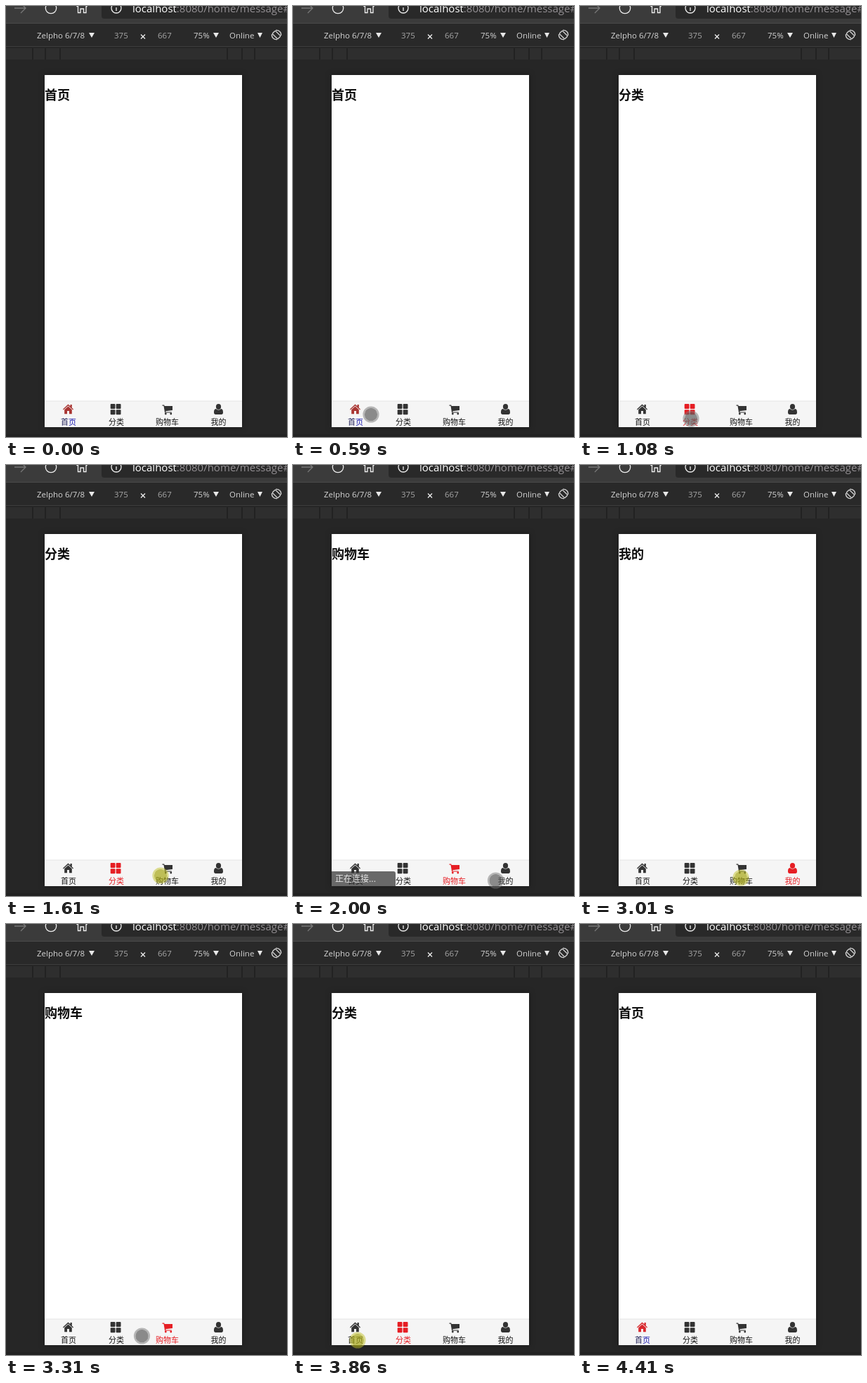
Recreate the animation shown at these times as an HTML page. Size 400 px wide and 612 px high, loop 4.72 s.

```html
<!DOCTYPE html>
<html lang="zh-CN">
<head>
<meta charset="utf-8">
<title>Tab bar</title>
<style>
  html, body { margin: 0; width: 100%; height: 100%; overflow: hidden; background: #262626; }
  svg { display: block; }
  text { font-family: "Open Sans", "Noto Sans", sans-serif; }
  .cjk text { font-family: "Noto Sans CJK SC", "Noto Sans CJK", sans-serif; }
  .tool { font-size: 11.5px; fill: #d4d4d4; }
  .dim { fill: #a6a6a6; }
  .line { fill: none; stroke: #eee; stroke-width: 1.3; }
  .page { fill: #fff; filter: drop-shadow(0 0 5px rgba(0, 0, 0, .3)); }
  .tab { fill: #333; }
  .tab text { font-size: 11px; text-anchor: middle; fill: #151515; }
  .tab.on, .tab.on text { fill: #e61e24; }
  #home.on { fill: #d9292e; }
  #home.on.old { fill: #a93532; }
  #home.on text { fill: #26265c; }
  #home.on tspan { fill: #1c1cb0; }
  #dot { fill: #5c5c5c; stroke: #777; }
  #dot.press { fill: #a6a614; stroke: #c4c42c; }
</style>
</head>
<body>
<svg width="400" height="612" viewBox="0 0 400 612">
  <rect width="400" height="24" fill="#3b3b3b"/>
  <rect x="136" y="-10" width="280" height="28" rx="4" fill="#292929"/>
  <path class="line" style="stroke:#777" d="M12 3H28M21 -4L28 3L21 10"/>
  <g class="line">
    <circle cx="64" cy="3" r="7.7"/>
    <path d="M102.5 -1V9.5H106V4H110.5V9.5H114V-1M100.5 1L108 -5L115.5 1"/>
    <circle cx="157" cy="3" r="7"/>
    <path d="M157 2V7"/>
  </g>
  <text x="180" y="9" font-size="15" fill="#fff">localhost<tspan fill="#949094">:8080/home/message#</tspan></text>

  <rect y="24" width="400" height="1" fill="#4a4a4a"/>
  <rect y="25" width="400" height="32" fill="#292929"/>
  <rect y="57" width="400" height="1" fill="#3d3d3d"/>
  <g class="tool">
    <text x="44" y="46">Zelpho 6/7/8</text>
    <text x="154" y="46" class="dim">375</text>
    <text x="216" y="46" class="dim">667</text>
    <text x="267" y="46">75%</text>
    <text x="318" y="46">Online</text>
  </g>
  <path fill="#e8e8e8" d="M118 38h8l-4 7zM295 38h8l-4 7zM358 38h7l-3.5 7z"/>
  <path class="line" d="M192 40.5l6 6m0 -6l-6 6"/>
  <g class="line" style="stroke:#d0d0d0" transform="translate(385 41)">
    <rect x="-3" y="-5.5" width="6" height="11" rx="1" transform="rotate(-45)"/>
    <path d="M-1 -6.5A6.5 6.5 0 0 1 6.5 1M1 6.5A6.5 6.5 0 0 1 -6.5 -1"/>
  </g>

  <rect y="60" width="400" height="16" fill="#2e2e2e"/>
  <path stroke="#222" stroke-width="2" d="M38 60v16M56 60v16M77 60v16M315 60v16M336 60v16M354 60v16"/>
  <rect y="608" width="400" height="4" fill="#222"/>

  <rect class="page" x="55" y="98" width="281" height="500"/>
  <rect x="55" y="561" width="281" height="37" fill="#f5f5f5"/>
  <rect x="55" y="560.5" width="281" height="1" fill="#e6e6e6"/>

  <g class="cjk">
    <text id="title" x="55" y="133" font-size="18" font-weight="700" fill="#0c0c0c"></text>
    <g class="tab" id="home">
      <path transform="translate(81 565)" d="M0 7.5L7.5 .5L10.5 3.3V1H12.8V5.5L15 7.5L14.2 8.5L7.5 2.6L.8 8.5ZM2.2 8.2L7.5 3.4L12.8 8.2V14.3H9V10H6V14.3H2.2Z"/>
      <text x="89" y="595">首<tspan>页</tspan></text>
    </g>
    <g class="tab">
      <g id="tiles" transform="translate(148.700 565)"></g>
      <text x="157" y="595">分类</text>
    </g>
    <g class="tab">
      <g transform="translate(222.500 566)">
        <path d="M0 .5H2.7L3.2 2H14.5V8L4.7 9.2L4.9 10.4H13.3V11.6H3.6L2 1.8H0Z"/>
        <circle cx="4.800" cy="13" r="1.400"/><circle cx="12.300" cy="13" r="1.400"/>
      </g>
      <text x="229.500" y="595">购物车</text>
    </g>
    <g class="tab">
      <g transform="translate(296 565)">
        <ellipse cx="6.500" cy="4" rx="3.600" ry="4"/>
        <path d="M3 7C0 7 0 11 0 12.5C0 14 1 15 2.3 15H10.7C12 15 13 14 13 12.5C13 11 13 7 10 7C8 9 5 9 3 7Z"/>
      </g>
      <text x="302.500" y="595">我的</text>
    </g>
    <g id="status">
      <path fill="#292929" fill-opacity=".8" d="M55 577H143q3 0 3 3V598H55Z"/>
      <text x="60" y="592" font-size="12" fill="#e4e4e4">正在连接...</text>
    </g>
  </g>

  <g id="dot">
    <circle r="9.200" fill-opacity=".7" stroke="none"/>
    <circle r="10.400" fill="none" stroke-width="2.400" stroke-opacity=".5"/>
  </g>
</svg>
<script>
const LOOP = 4720, TICK = 77.4, LAST = 57;
const $ = id => document.getElementById(id);
const tabs = [...document.querySelectorAll('.tab')];
const names = ['首页', '分类', '购物车', '我的'];

// Pointer glides; go, end and turn (when a tab opens) are counted in ticks.
const glides = [
  { go: 1, end: 8, x: 111, y: 580 },
  { go: 8, end: 10, x: 158, y: 586, turn: 14, tab: 1 },
  { go: 14, end: 20, x: 220, y: 583, turn: 23, tab: 2 },
  { go: 23, end: 26, x: 288.5, y: 590, turn: 32, tab: 3 },
  { go: 34, end: 38, x: 229, y: 586, turn: 40, tab: 2 },
  { go: 40, end: 46, x: 158, y: 584, turn: 47, tab: 1 },
  { go: 47, end: 50, x: 92, y: 591, turn: 51, tab: 0 },
  { go: 51, end: 54, x: 189, y: 591 },
  { go: 54, end: LAST, x: 420, y: 608 }
];

$('tiles').innerHTML = [0, 1, 2, 3].map(i =>
  `<rect x="${i % 2 * 8}" y="${(i >> 1) * 8.2}" width="6.8" height="7" rx="1"/>`).join('');

const clamp = v => Math.max(0, Math.min(1, v));
const ease = v => v * v * (3 - 2 * v);

function draw(t) {
  const n = Math.min(LAST, Math.floor(t / TICK + 0.4));
  let x = 250, y = 606, page = 0, press = false;
  for (const g of glides) {
    const k = ease(clamp((n - g.go) / (g.end - g.go)));
    x += (g.x - x) * k;
    y += (g.y - y) * k;
    if (n >= g.turn) page = g.tab;
    press ||= n >= g.turn - 2 && n < g.turn;
  }
  $('title').textContent = names[page];
  tabs.forEach((tab, i) => tab.classList.toggle('on', i === page));
  $('home').classList.toggle('old', n < 14);
  $('status').setAttribute('opacity', clamp((n - 25) * 0.85) * clamp(30 - n));
  const dot = $('dot');
  dot.setAttribute('visibility', n > 0 && n < LAST ? 'visible' : 'hidden');
  dot.setAttribute('transform', `translate(${x} ${y})`);
  dot.classList.toggle('press', press);
}

const start = performance.now();
function frame() {
  draw((performance.now() - start) % LOOP);
  requestAnimationFrame(frame);
}
frame();
</script>
</body>
</html>
```
